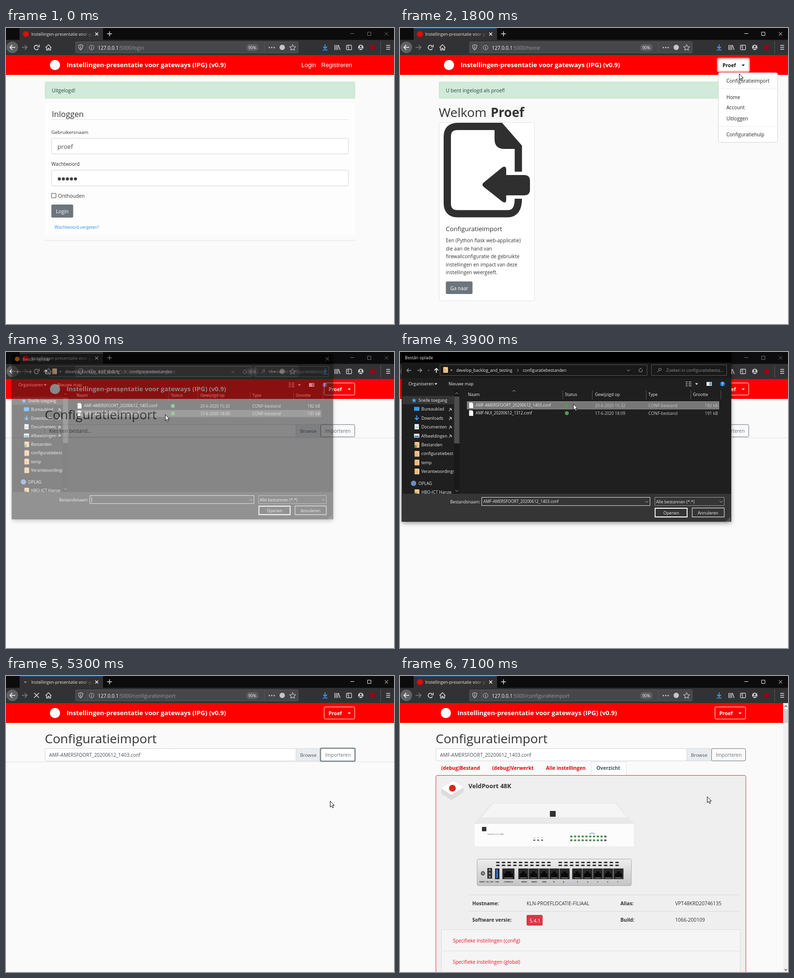
These frames come from a looping animation (800 by 612 pixels, 7200 ms). An HTML page with a canvas:

```html
<!DOCTYPE html>
<html lang="nl">
<meta charset="utf-8">
<title>Instellingen-presentatie</title>
<style>
html, body { margin: 0; width: 800px; height: 612px; overflow: hidden; background: #fafafa }
canvas { display: block }
</style>
<canvas id="stage" width="800" height="612"></canvas>
<script>
const LOOP = 7200;
const APP = 'Instellingen-presentatie voor gateways';
const FILE = 'AMF-AMERSFOORT_20200612_1403.conf';
const RED = '#f00', INK = '#333', GREY = '#6c757d', RULE = '#dfe1e3', LIGHT = '#f9f9fa';

const screen2d = stage.getContext('2d');
const layer = document.createElement('canvas');
layer.width = 800; layer.height = 380;
const layer2d = layer.getContext('2d');
let c = screen2d;

function paint(shape, fill, line, width) {
  if (fill) { c.fillStyle = fill; c.fill(shape); }
  if (line) { c.strokeStyle = line; c.lineWidth = width; c.stroke(shape); }
}
function box(x, y, w, h, fill, line, r = 0, width = 1) {
  const p = new Path2D();
  p.roundRect(x, y, w, h, r);
  paint(p, fill, line, width);
}
function dot(x, y, r, fill, line, width = 1.3) {
  const p = new Path2D();
  p.arc(x, y, r, 0, 7);
  paint(p, fill, line, width);
}
const path = (d, line, width = 1.3, fill) => paint(new Path2D(d), fill, line, width);
const hline = (x1, x2, y, color = RULE) => path(`M${x1} ${y}H${x2}`, color, 1);

// y is the middle of the capitals
function text(s, x, y, size = 10.1, color = INK, weight = 400, family = '"Open Sans"') {
  c.font = `${weight} ${size}px ${family}, sans-serif`;
  c.fillStyle = color;
  c.fillText(s, x, y + size * .36);
}
function clipped(x, y, w, h, draw) {
  c.save();
  c.beginPath(); c.rect(x, y, w, h); c.clip();
  draw();
  c.restore();
}

function browser(url, loading, active, t) {
  box(0, 0, 800, 25, '#0c0c0d');
  box(28, 0, 172, 25, '#323234');
  box(0, 24.5, 800, 31.5, '#323234');
  if (active) box(28, 0, 172, 1, '#0a64c0');
  if (loading) box(39.5 + 3 * Math.sin(t / 150), 11.5, 5, 2, '#aaa', null, 1);
  else dot(41, 12.5, 6, RED);
  const fade = c.createLinearGradient(155, 0, 179, 0);
  fade.addColorStop(0, '#e4e4e6'); fade.addColorStop(1, '#e4e4e600');
  clipped(50, 0, 130, 25, () => text(APP, 52, 13, 8.7, fade));
  path('M184 9.5l6 6m0-6l-6 6', '#fff');
  path('M208.500 12h10m-5-5v10', '#ddd', 1.4);
  const ctl = active ? '#eee' : '#707070';
  path('M710 11.500h8M745.500 8.500h7v7h-7zM781 8.500l7 7m0-7l-7 7', ctl, 1);

  dot(13, 40, 12, '#616163');
  path('M19 40H8m5-5l-5 5 5 5', LIGHT, 1.6);
  path('M32.500 40h11m-5-5l5 5-5 5', '#7c7c7e', 1.5);
  if (loading) path('M58 35l10 10m0-10l-10 10', '#ddd', 1.5);
  else path('M67 42.500a4.700 4.700 0 1 1-.8-5.500M68.500 34.500v4.500h-4.500', '#ddd', 1.6);
  path('M81.500 40.500l6-6 6 6M83.500 39.500v6h3v-3.500h2.500v3.500h3v-6', '#ddd', 1.4);

  box(143.5, 28.5, 459, 23, '#474749', '#5a5a5c', 2);
  path('M149.500 36l4.500-1.500 4.500 1.500c0 5-1.500 7.500-4.500 9.500-3-2-4.500-4.500-4.500-9.500M154 37v6', '#c5c5c7', 1.2);
  path('M168.500 30v20', '#5a5a5c', 1);
  dot(176.5, 40.5, 4.8, null, '#c5c5c7', 1);
  path('M176.500 39.500v4m0-6v1', '#c5c5c7', 1.2);
  const host = '127.0.0.1';
  text(host, 189.5, 41, 10.1, LIGHT);
  text(':5000/' + url, 189.5 + c.measureText(host).width, 41, 10.1, '#98989a');
  box(495, 33, 26, 15, '#5b5b5d', null, 7);
  text('90%', 499.5, 41, 8.5, '#f0f0f0');
  path('M532.500 30v20', '#5a5a5c', 1);
  for (let x = 543; x < 555; x += 5) dot(x, 40.5, 1.4, '#c5c5c7');
  dot(569.5, 40, 5.5, '#c5c5c7');
  path('M591 34.500l1.800 3.800 4.200.6-3 3 .7 4.100-3.700-2-3.700 2 .7-4.100-3-3 4.200-.6z', '#c5c5c7', 1.2);

  path('M658 34v8m-4-3.500l4 4 4-4M653 45.500h10', '#45a1ff', 1.7);
  path('M678 35v10.500m3-10.500v10.500m3-10.500v10.500m1.500-10l3.500 10', '#ccc', 1.5);
  box(702, 35.5, 10.5, 9.5, null, '#ccc', 1.5, 1.4);
  path('M706.500 36v9M703.500 38h2m-2 2.500h2', '#ccc', 1);
  dot(731.5, 40, 5.5, '#ccc');
  dot(731.5, 38.2, 1.9, '#323234');
  path('M728 43.500q3.500-4 7 0', '#323234', 1.5);
  dot(756, 40, 5.5, '#9c0010');
  path('M772.500 27v26', '#58585a', 1);
  path('M784 36h8m-8 4h8m-8 4h8', '#ddd', 1.5);
}

function header(loggedIn, open) {
  box(-10, 56, 820, 41, RED);
  dot(101, 76.5, 10.5, '#fff');
  text(APP + ' (IPG) (v0.9)', 125, 76.5, 13.15, '#fff', 700);
  if (!loggedIn) {
    text('Login', 609, 77, 12.3, '#fff', 400, '"Liberation Sans"');
    text('Registreren', 650, 77, 12.3, '#fff', 400, '"Liberation Sans"');
    return;
  }
  if (open) box(655, 63, 65, 27, '#fff', '#ffb0b0', 3, 3);
  else box(656, 64, 63, 25, null, '#fff', 2.5);
  const ink = open ? '#111' : '#fff';
  text('Proef', 665, 77, 10.4, ink, 700);
  path('M704.500 75.500h6.500l-3.250 3.500z', null, 0, ink);
}

function alertBar(s) {
  box(80.5, 111.5, 639, 34, '#d1ead9', '#c3e6cb', 2.5);
  text(s, 94.5, 129, 10.2, '#2c4a36');
}

function loginPage() {
  alertBar('Uitgelogd!');
  box(80, 155, 640, 272, '#fdfdfd');
  text('Inloggen', 94.5, 178, 16.4);
  hline(94, 706, 189.5);
  text('Gebruikersnaam', 93.5, 215, 9.8);
  text('Wachtwoord', 93.5, 281, 9.9);
  for (const y of [228, 294]) box(94, y, 612, 32.5, '#fff', '#ced4da', 3);
  text('proef', 106, 245.5, 12.8, '#495057');
  for (let i = 0; i < 5; i++) dot(110 + i * 8.3, 312, 3.2, '#404040');
  box(94, 342, 9, 9, '#fff', '#444');
  text('Onthouden', 107.5, 347, 10.2);
  box(93.5, 365, 45, 27, GREY, null, 2.5);
  text('Login', 103, 379.5, 10.3, '#fff');
  text('Wachtwoord vergeten?', 100, 412, 8.6, '#2b8cee');
  hline(80, 720, 439.5);
}

function homePage() {
  alertBar('U bent ingelogd als proef!');
  text('Welkom', 80, 174.5, 26.2);
  text('Proef', 187, 174.5, 26, INK, 700);
  box(81, 195.5, 196.5, 368.5, '#fff', RULE, 3);
  path('M244 297V246L207 203.500H119Q97.500 203.500 97.500 225V362Q97.500 384 119 384H222Q244 384 244 353', '#2f2f2f', 15);
  path('M195 203V230Q195 250 215 250H249L245 240 208 203Z', null, 0, '#2f2f2f');
  path('M172 320L211 288Q219 284 219 293V304H256Q268 304 268 316V334Q268 346 256 346H219V355Q219 364 211 359L172 328Q168 324 172 320Z', null, 0, '#2f2f2f');
  text('Configuratieimport', 94.5, 415, 13.1);
  ['Een (Python flask web-applicatie)', 'die aan de hand van', 'firewallconfiguratie de gebruikte',
    'instellingen en impact van deze', 'instellingen weergeeft.']
    .forEach((s, i) => text(s, 94.5, 439.5 + i * 16.5, 10.1));
  box(94.5, 524, 55, 26, GREY, null, 2.5);
  text('Ga naar', 103.5, 538, 10.1, '#fff');
}

function menu() {
  box(656.5, 92.5, 122, 144, '#fff', '#d4d4d4', 3);
  [['Configuratieimport', 109.5], ['Home', 143], ['Account', 164.5], ['Uitloggen', 187], ['Configuratiehulp', 220.5]]
    .forEach(([s, y]) => text(s, 673, y, 10, '#212529'));
  hline(657, 778, 125.5, '#e9ecef');
  hline(657, 778, 203.5, '#e9ecef');
}

function importPage(chosen, focus, result) {
  text('Configuratieimport', 80, 129.5, 26);
  if (!result) hline(0, 800, 177.5);
  box(80.5, 150, 518, 25.5, '#fff', '#ced4da', 2.5);
  text(chosen ? FILE : 'Kies een bestand...', 89, 163, 9.95, '#495057');
  box(598, 150, 51, 25.5, '#e9ecef', '#ced4da');
  text('Browse', 606.5, 163, 9.8, '#495057');
  if (focus) box(648.5, 149.5, 71, 26.5, '#fff', '#8a929b', 2, 3);
  box(649, 150, 70, 25.5, focus ? '#fff' : '#fafafa', GREY, 2.5);
  text('Importeren', 658, 163, 9.95, GREY);
}

function device() {
  // front
  path('M189 263H446L481 304H153Z', null, 0, '#e9e9ea');
  path('M192 264H444L468 292H168Z', null, 0, '#f5f5f6');
  box(154, 304, 328, 48, '#fcfcfc');
  hline(153, 482, 304.5, '#dcdcde');
  box(309, 279, 12, 12, '#333');
  box(169, 312, 9, 9, '#333');
  text('VeldPoort 48K', 180, 327, 5.2, '#888');
  for (let x = 275; x < 296; x += 8) { box(x, 338, 4, 3, '#777'); box(x, 334, 4, 1, '#aaa'); }
  for (let i = 0; i < 10; i++)
    for (const y of [330, 338]) box(351 + i * 7.8, y, 4.500, 3.500, i < 9 ? '#4a8a50' : '#555');
  path('M392 328v-3h8v3', '#5577cc', 1);
  // back
  const metal = c.createLinearGradient(0, 378, 0, 434);
  metal.addColorStop(0, '#eee'); metal.addColorStop(1, '#c4c4c6');
  box(159, 378.5, 318, 55, metal, '#aaa', 3);
  for (let i = 0; i < 22; i++)
    if (i != 10)
      for (const y of [384, 390]) box(198 + i * 11.7, y, 7.500, 3, '#333', null, 1.5);
  dot(171, 408, 3.5, '#999', '#333', 1.5);
  box(180, 397, 10, 22, '#333', null, 1);
  for (const y of [401, 408, 415]) dot(185, y, 2, '#999');
  box(196, 398, 9, 22, '#222');
  box(198, 400, 4, 18, '#2d6fc0');
  function port(x, w) {
    box(x, 398, w, 22, '#292929');
    path(`M${x + 3} 416v-8h4v-4h${w - 14}v4h4v8z`, null, 0, '#0a0a0a');
    hline(x + 4, x + w - 4, 417.5, '#999');
  }
  port(211, 25);
  for (let i = 0; i < 5; i++) { port(244 + i * 21.3, 20.5); port(355 + i * 21.3, 20.5); }
  [['RESET', 164], ['DC+12V', 178], ['USB', 196], ['CONSOLE', 214], ['WAN2', 250], ['WAN1', 271], ['DMZ', 293], ['B', 316], ['A', 336]]
    .forEach(([s, x]) => text(s, x, 426, 4, '#333', 700));
  for (let i = 0; i < 5; i++) text(5 - i, 365 + i * 20.7, 426, 4, '#333', 700);
}

function results() {
  box(394.5, 177.5, 72, 30, '#fff', RULE, 2);
  [['(debug)Bestand', 85], ['(debug)Verwerkt', 190], ['Alle instellingen', 301]]
    .forEach(([s, x]) => text(s, x, 190.5, 10.2, '#e8000c', 700));
  text('Overzicht', 405, 190.5, 10.2, '#495057', 700);
  box(74, 205.5, 639, 420, '#efefef', '#dc3545', 3);
  path('M85 232L110 217 131 230V240L106 257 85 243Z', null, 0, '#dcdcde');
  path('M85 232L110 217 131 230 106 246Z', null, 0, '#fff');
  dot(108, 232, 7, '#da291c');
  text('VeldPoort 48K', 141, 227, 12.7, INK, 700);
  device();
  for (const y of [452.5, 486.5]) hline(141, 701, y, '#d9dbdd');
  [['Hostname:', 149, 470], ['Alias:', 454.5, 470], ['Software versie:', 149, 504.5], ['Build:', 454.5, 504.5]]
    .forEach(([s, x, y]) => text(s, x, y, 10.1, INK, 700));
  text('KLN-PROEFLOCATIE-FILIAAL', 261, 470);
  text('VPT48KRD20746135', 567.5, 470);
  text('1066-200109', 567.5, 504.5);
  box(261, 494, 33, 22, '#dc3545', null, 2.5);
  text('5.4.1', 267, 506, 10.1, '#fff');
  ['config', 'global'].forEach((s, i) => {
    box(85.5, 524.5 + i * 44, 616, 44, '#f5f5f5', '#dedede');
    text(`Specifieke instellingen (${s})`, 109, 547 + i * 44, 9.95, '#f01020');
  });
}

function scrollbar() {
  box(790, 56, 10, 556, '#f0f0f0');
  box(791, 69, 9, 28, '#cdcdcd');
  path('M793 64l2.500-3 2.500 3M793 606l2.500 3 2.500-3', '#555', 1.3);
}

const folder = (x, y) => {
  box(x, y - 6, 10, 12, '#efb679', null, 1);
  path(`M${x + 2} ${y - 5}l6 2v8`, '#fbdcae', 1.5);
};

function fileDialog(selected, moving) {
  c.clearRect(0, 0, 800, 380);
  c.shadowColor = '#0007'; c.shadowBlur = 9; c.shadowOffsetY = 2;
  box(3.5, 0, 679.5, 351, '#1f1f1f');
  c.shadowColor = 'transparent';
  box(3.5, 0, 679.5, 22, '#000');
  box(3.5, 22, 679.5, 32, '#191919');
  const white = '#ececec', pale = '#b5b5b5';
  const label = (s, x, y, size = 8.7, color = white) => text(s, x, y, size, color);
  if (moving) { dot(15, 11, 5, '#ff7a1a'); path('M667 7l7 7m0-7l-7 7', white, 1); }
  label('Bestân oplade', moving ? 26 : 10, 11.5);

  path('M23 38h-9m4-4l-4 4 4 4M36 38h9m-4-4l4 4-4 4', '#999');
  path('M57 37l2 2 2-2', '#999', 1);
  path('M75 43v-9m-4 4l4-4 4 4', '#fff', 1.6);
  box(82.5, 26.5, 427, 22, '#191919', '#555');
  folder(89, 37);
  label('«', 104, 37);
  label('develop_backlog_and_testing', 116, 38, 8.55);
  path('M241.500 35l3 3-3 3M468 36.500l3 3 3-3', pale, 1);
  label('configuratiebestanden', 253, 38, 8.55);
  path('M499 36a3.500 3.500 0 1 1-3-1.500l2-1', pale, 1);
  box(518.5, 26.5, 155, 22, '#191919', '#555');
  dot(536, 36, 2.5, null, '#999', 1);
  path('M534 38l-4 4', '#999', 1);
  label('Zoeken in configuratiebesta...', 549, 38, 8.6, '#8c8c8c');

  label('Organiseren', 17.5, 66, 9);
  label('Nieuwe map', 100, 66, 8.8);
  path('M71 64.500h6l-3 3.500zM608.500 64.500h6l-3 3.500z', null, 0, white);
  path('M589 62h4m2 0h6m-12 4h4m2 0h6m-12 4h4m2 0h6', pale, 1.5);
  box(632, 62, 11, 8, '#eee'); box(638, 63, 4, 6, '#3d9be9');
  dot(665, 66, 5, '#1b7fd4');
  text('?', 663, 66, 8, '#fff', 700);

  [['Naam', 140], ['Status', 340], ['Gewijzigd op', 402], ['Type', 512], ['Grootte', 604]]
    .forEach(([s, x]) => label(s, x, 88));
  for (const x of [335.5, 396.5, 507.5, 599.5, 661.5]) path(`M${x} 79v19`, '#555', 1);
  path('M232 82l3-3 3 3', pale, 1);
  if (selected) box(138.5, 102.5, 519, 15.5, '#777', '#999');
  else box(138, 119, 520, 15, '#4d4d4d');
  [[FILE, '20-6-2020 15:32', '182 kB'], ['AMF-NUI_20200612_1312.conf', '17-6-2020 18:09', '191 kB']]
    .forEach(([name, date, size], i) => {
      const y = 110.5 + i * 16;
      path(`M142.500 ${y - 6}h6l2.500 2.500v9h-8.500z`, null, 0, '#fff');
      label(name, 156, y, 8.2);
      dot(344, y, 4, '#4f9a52');
      label(date, 402, y, 8.4, '#c8c8c8');
      label('CONF-bestand', 512, y, 8.9, '#c8c8c8');
      label(size, 628.5, y, 8.6, '#c8c8c8');
    });

  clipped(3, 78, 122, 215, () => {
    box(5, 91, 106, 17, '#353535');
    box(111, 78, 12, 215, '#191919');
    box(111.5, 92, 11, 97, '#4d4d4d');
    path('M114 87l3-3 3 3M114 285.500l3 3 3-3', pale, 1);
    path('M29 95l1.300 3.300 3.700.2-2.800 2.500.8 3.500-3-2-3 2 .8-3.500-2.800-2.500 3.700-.2z', null, 0, '#4aa8ff');
    box(29, 113.500, 11, 8, '#2f9bff');
    path('M34.500 131v9m-4-4l4 4 4-4', '#2f9bff', 2);
    box(30, 149, 9, 11, '#e8eef4'); hline(32, 37, 155.5, '#48a');
    box(29, 169, 11, 8, '#e8eef4'); box(30, 173, 9, 3, '#48a');
    for (const y of [192, 210.5, 228.5, 247, 290]) folder(30, y);
    for (const y of [195, 293]) dot(32, y, 2.5, '#4f9a52');
    dot(28, 271.5, 5.5, '#6d8fc4');
  });
  clipped(3, 78, 108, 215, () => {
    ['Snelle toegang', 'Bureaublad', 'Downloads', 'Documenten', 'Afbeeldingen', 'Bestanden', 'configuratiebest', 'temp', 'Verantwoordings']
      .forEach((s, i) => label(s, i ? 44 : 38, 100 + i * 18.35));
    label('OPLAG', 38, 271.5);
    label('HBO-ICT Hanze', 44, 290);
  });
  for (let i = 0; i < 4; i++) path(`M101 ${122 + i * 18.3}l3-3m-2-3l5 5m-3-5l3 3`, pale, 1.3);

  box(3.5, 293, 679.5, 58, '#353535');
  label('Bestandsnaam:', 103.5, 309.5, 8.6);
  box(168.5, 300.500, 347, 17, '#353535', '#ddd');
  if (selected) label(FILE, 172, 309.5, 8.2); else path('M172.500 304v11', white, 1);
  box(525.5, 300.5, 143, 17, '#353535', '#999');
  label('Alle bestannen (*.*)', 528, 309.5);
  path('M506 308l3 3 3-3M659 308l3 3 3-3', pale, 1);
  box(526, 323, 66, 18, '#353535', '#fff', 0, 1.8);
  box(602.5, 322.500, 66, 18.5, '#353535', '#ccc', 0, 1.3);
  label('Openen', 543, 332.5);
  label('Annuleren', 614, 332.5);
  for (const [x, y] of [[679, 343], [676, 346], [679, 346], [673, 349], [676, 349], [679, 349]]) box(x, y, 1.5, 1.5, '#aaa');
}

// time, x, y
const route = [
  [200, 300, 470], [700, 116, 376], [1000, 116, 376], [1600, 690, 74], [1800, 699, 94], [2000, 704, 106],
  [2300, 704, 106], [2800, 363, 161], [3100, 363, 161], [3300, 328, 129], [3700, 357, 107], [4100, 357, 107],
  [4700, 684, 160], [4900, 684, 160], [5300, 668, 258], [6400, 668, 258], [7100, 633, 249]
];
function cursor(t) {
  if (t < route[0][0]) return;
  const i = Math.max(1, route.findIndex(p => p[0] >= t));
  const [t0, x0, y0] = route[i - 1], [t1, x1, y1] = route[i];
  const k = (t - t0) / (t1 - t0), e = k * k * (3 - 2 * k);
  c.save();
  c.translate(x0 + (x1 - x0) * e, y0 + (y1 - y0) * e);
  path('M.5 .5V13L3.300 10.300 5.300 14.800 7.300 13.900 5.300 9.500H9Z', '#111', 1, '#fff');
  c.restore();
}

function draw(t) {
  const during = (a, b) => t >= a && t < b;
  const loggedIn = t >= 1000, home = during(1000, 2200), done = t >= 6500;
  const open = during(1700, 2100), loading = during(700, 1000) || during(2000, 2200) || during(4900, 6500);
  box(0, 0, 800, 612, '#fafafa');
  c.save();
  if (done) c.translate(-6.5, 0);
  header(loggedIn, open);
  if (!loggedIn) loginPage();
  else if (home) homePage();
  else importPage(t >= 4100, during(4900, 6500), done);
  c.restore();
  if (open) menu();
  if (done) { results(); scrollbar(); }
  browser(!loggedIn ? 'login' : home ? 'home' : 'configuratieimport', loading, !(t < 100 || during(3200, 4100)), t);

  if (during(3300, 4100)) {
    const moving = t < 3400 || t >= 4000;
    c = layer2d;
    fileDialog(t >= 3600, moving);
    c = screen2d;
    c.save();
    if (moving) {
      c.globalAlpha = .53;
      c.translate(343, 150); c.scale(.975, .975); c.translate(-343, -150);
    }
    c.drawImage(layer, 0, 0);
    c.restore();
  }
  cursor(t);
}

function tick() {
  draw(Math.floor(performance.now() % LOOP / 100) * 100);
  requestAnimationFrame(tick);
}
tick();
</script>
</html>
```
